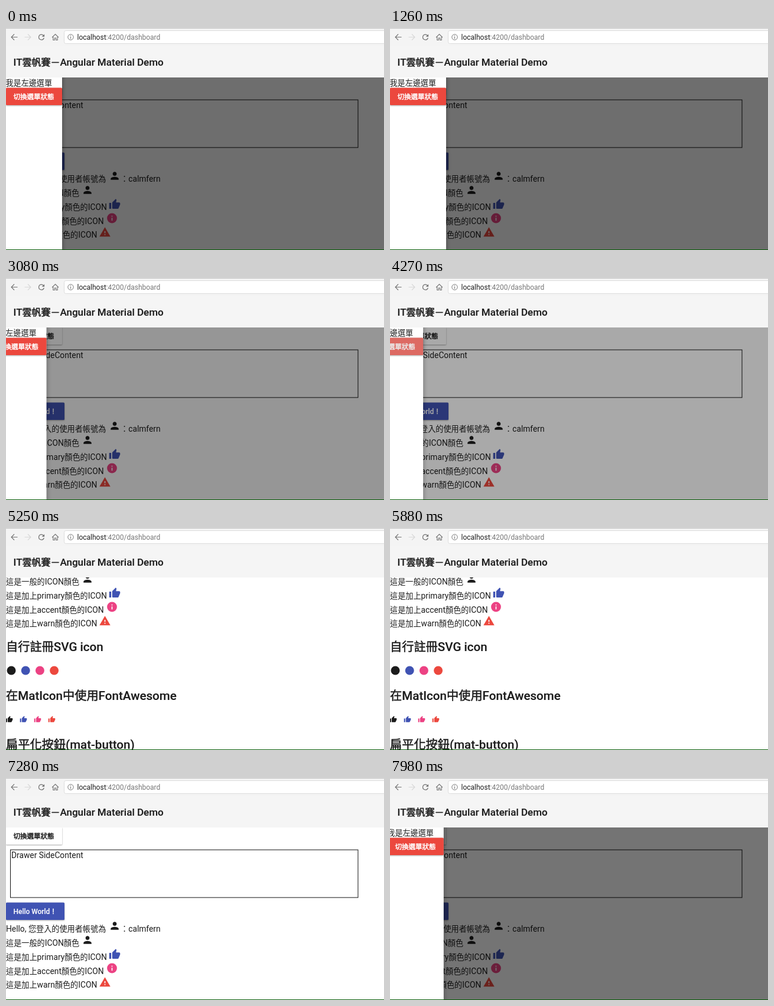
An HTML page that plays this animation: 640x377 px, repeating every 8 s.

```html
<!DOCTYPE html>
<html lang="zh-Hant">
<head>
<meta charset="utf-8">
<title>Angular Material Demo</title>
<style>
  html, body { margin: 0; width: 100%; height: 100%; overflow: hidden; background: #fff; }
  svg { display: block; width: 100vw; height: 100vh; }
  text { font-family: Roboto, "Noto Sans CJK TC", "Noto Sans CJK SC", "Noto Sans CJK JP", "Noto Sans CJK", sans-serif; fill: #1c1c1c; }
  .medium { font-weight: 500; stroke: #1c1c1c; stroke-width: .15px; }
  .medium .cjk { stroke-width: .5px; }
  .light, .light .cjk { fill: #fff; stroke: #fff; }
  .raised { filter: drop-shadow(0 1.2px 1px rgba(0, 0, 0, .35)); }
</style>
</head>
<body>
<svg id="stage" viewBox="0 0 640 377" preserveAspectRatio="none"></svg>
<script>
const LOOP = 8000, STEP = 70, DRAWER = 95;
const INK = '#1c1c1c', PRIMARY = '#4053b3', ACCENT = '#ec4283', WARN = '#ec483e', CHROME = '#747474';
const THEME = [INK, PRIMARY, ACCENT, WARN];

const PATHS = {
  person: 'M12 12c2.21 0 4-1.79 4-4s-1.79-4-4-4-4 1.79-4 4 1.79 4 4 4zm0 2c-2.67 0-8 1.34-8 4v2h16v-2c0-2.66-5.33-4-8-4z',
  thumb: 'M1 21h4V9H1v12zm22-11c0-1.1-.9-2-2-2h-6.31l.95-4.57.03-.32c0-.41-.17-.79-.44-1.06L14.17 1 7.59 7.59C7.22 7.95 7 8.45 7 9v10c0 1.1.9 2 2 2h9c.83 0 1.54-.5 1.84-1.22l3.02-7.05c.09-.23.14-.47.14-.73v-2z',
  info: 'M12 2a10 10 0 1 0 0 20 10 10 0 0 0 0-20zm1 15h-2v-6h2v6zm0-8h-2V7h2v2z',
  warning: 'M1 21h22L12 2 1 21zm12-3h-2v-2h2v2zm0-4h-2v-4h2v4z',
  reload: 'M17.65 6.35C16.2 4.9 14.21 4 12 4a8 8 0 1 0 7.73 10h-2.08A6 6 0 1 1 12 6c1.66 0 3.14.69 4.22 1.78L13 11h7V4l-2.35 2.35z'
};

// Icon on a 24 unit grid, centred on x, y
const icon = (name, x, y, color, scale = .84) =>
  `<path d="${PATHS[name]}" fill="${color}" fill-rule="evenodd"
    transform="translate(${x} ${y}) scale(${scale}) translate(-12 -12)"/>`;
const outline = (d, color = CHROME) => `<path d="${d}" fill="none" stroke="${color}" stroke-width="1.1"/>`;

// Text line whose Latin and CJK runs have their own sizes
function label(x, y, string, latin, cjk, style = '') {
  const runs = string.split(/([\u3000-\u9fff\uff00-\uffef]+)/).map((run, i) =>
    run && `<tspan font-size="${i % 2 ? cjk : latin}"${i % 2 ? ' class="cjk"' : ''}>${run}</tspan>`);
  return `<text x="${x}" y="${y}" class="${style}">${runs.join('')}</text>`;
}
const line = (x, y, string) => label(x, y, string, 13.8, 13.15);
const heading = (y, string) => label(0, y, string, 20.6, 20.2, 'medium');
const rect = (x, y, w, h, fill, more = '') =>
  `<rect x="${x}" y="${y}" width="${w}" height="${h}" fill="${fill}" ${more}/>`;
const button = (y, w, fill, string, style) =>
  rect(0, y, w, 29.5, fill, 'rx="1.5" class="raised"') + label(12.6, y + 19.5, string, 11.9, 11.5, 'medium ' + style);

const content = `<g id="content">
  ${button(83.5, 95, '#fff', '切換選單狀態', '')}
  ${rect(7.5, 122, 588.5, 81, 'none', 'stroke="#111"')}
  ${line(9, 136, 'Drawer SideContent')}
  ${button(211.5, 99, PRIMARY, 'Hello World！', 'light')}
  ${line(0, 261, 'Hello, 您登入的使用者帳號為')} ${icon('person', 184, 251, INK)} ${line(194, 261, '：calmfern')}
  ${line(0, 285, '這是一般的ICON顏色')} ${icon('person', 138, 275, INK)}
  ${line(0, 308.5, '這是加上primary顏色的ICON')} ${icon('thumb', 184, 299.5, PRIMARY)}
  ${line(0, 332.5, '這是加上accent顏色的ICON')} ${icon('info', 179.5, 323, ACCENT)}
  ${line(0, 356, '這是加上warn顏色的ICON')} ${icon('warning', 167.5, 346.7, WARN)}
  ${heading(398, '自行註冊SVG icon')}
  ${THEME.map((c, i) => `<circle cx="${9 + i * 24.2}" cy="431" r="7.5" fill="${c}"/>`).join('')}
  ${heading(481, '在MatIcon中使用FontAwesome')}
  ${THEME.map((c, i) => icon('thumb', 5.5 + i * 24, 514, c, .53)).join('')}
  ${heading(564, '扁平化按鈕(mat-button)')}
</g>`;

const drawer = `<g id="drawer">
  ${rect(0, 70, DRAWER, 320, '#fff', 'style="filter:drop-shadow(2px 1px 3px rgba(0,0,0,.22))"')}
  ${label(-.5, 98, '我是左邊選單', 13, 13.1)}
  ${button(101.5, DRAWER, WARN, '切換選單狀態', 'light')}
  ${rect(0, 101.5, DRAWER, 29.5, '#bbb', 'id="ripple" rx="1.5"')}
</g>`;

const browser = `
  ${rect(0, 0, 640, 31, '#f4f4f4')} ${rect(0, 0, 640, 1, '#c4c4c4')}
  ${rect(98.5, 4.5, 560, 22, '#fff', 'rx="3" stroke="#dcdcdc"')}
  ${outline('M19.5 15.5H9M14 10.5l-5 5 5 5')} ${outline('M31.500 15.500H42M37 10.500l5 5-5 5', '#d8d8d8')}
  ${icon('reload', 60, 15.5, CHROME, .64)}
  ${outline('M78 16 83.5 10.5l5.500 5.500M79.800 15v5.500h2.500v-3.500h2.400v3.500h2.500v-5.500')}
  <circle cx="109.500" cy="15.500" r="4.700" fill="none" stroke="${CHROME}"/>
  ${outline('M109.500 12.700v1.200M109.500 15v3.300')}
  <text x="120.5" y="20" font-size="12">localhost<tspan fill="#777">:4200/dashboard</tspan></text>
  ${rect(0, 31, 640, 52.5, '#f5f5f5', 'shape-rendering="crispEdges"')}
  ${label(12.6, 64, 'IT雲帆賽－Angular Material Demo', 17.05, 16, 'medium')}
  ${rect(0, 376, 640, 1, '#075c07')}`;

const $ = id => document.getElementById(id);
$('stage').innerHTML = rect(0, 0, 640, 377, '#fff') + content +
  rect(0, 83, 640, 293, '#000', 'id="backdrop"') + drawer + browser;

const clamp = v => Math.min(1, Math.max(0, v));
const smooth = (t, from, to) => { const p = clamp((t - from) / (to - from)); return p * p * (3 - 2 * p); };

// cubic-bezier(.25, .8, .25, 1)
function swift(x) {
  let lo = 0, hi = 1;
  const curve = (s, a, b) => 3 * (1 - s) ** 2 * s * a + 3 * (1 - s) * s * s * b + s ** 3;
  for (let i = 0; i < 20; i++) {
    const mid = (lo + hi) / 2;
    if (curve(mid, .25, .25) < x) lo = mid; else hi = mid;
  }
  return x >= 1 ? 1 : curve(lo, .8, 1);
}

const TOGGLES = [[1840, false], [2977, true], [4219, false], [7755, true]];

function render(t) {
  let open = 1, ripple = 0;
  for (const [start, opening] of TOGGLES) {
    if (t >= start) {
      const p = swift(clamp((t - start) / 400));
      open = opening ? p : 1 - p;
    }
    if (!opening && t < start + 500) ripple = Math.max(ripple, clamp((t - start + 100) / 140));
  }
  const scroll = 189 * (smooth(t, 4900, 5250) - smooth(t, 6000, 6957));

  $('content').setAttribute('transform', `translate(0 ${-scroll})`);
  $('drawer').setAttribute('transform', `translate(${DRAWER * (open - 1)} 0)`);
  $('drawer').setAttribute('visibility', open > .001 ? 'visible' : 'hidden');
  $('backdrop').setAttribute('opacity', .57 * open);
  $('ripple').setAttribute('opacity', .3 * ripple);
}

const begin = performance.now();
function tick() {
  const t = (performance.now() - begin) % LOOP;
  render(Math.floor(t / STEP) * STEP);
  requestAnimationFrame(tick);
}
tick();
</script>
</body>
</html>
```
